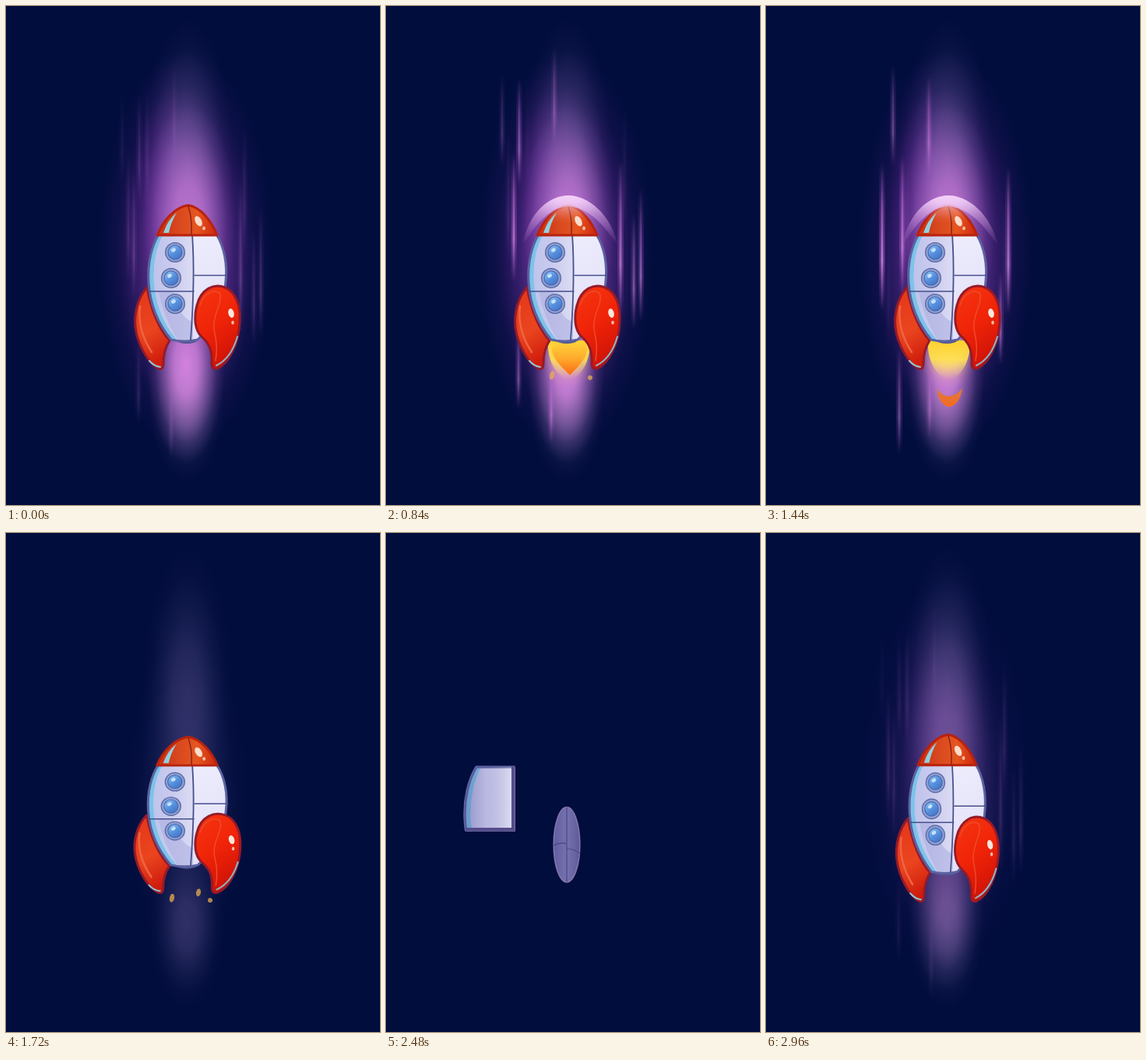
An HTML page with a canvas for the animation above (3000 ms loop, 480 by 640 pixels).

```html
<!DOCTYPE html>
<html lang="en">
<head>
<meta charset="utf-8">
<title>Rocket</title>
<style>
html, body { margin: 0; width: 100%; height: 100%; overflow: hidden; background: #010d3d; }
canvas { display: block; width: 100vw; height: 100vh; }
</style>
</head>
<body>
<canvas id="stage" width="480" height="640"></canvas>
<script>
const ctx = document.getElementById('stage').getContext('2d');
const LOOP = 3000;

const ramp = (t, a, b) => Math.min(1, Math.max(0, (t - a) / (b - a)));
const smooth = x => x * x * (3 - 2 * x);
const easeOut = x => 1 - (1 - x) ** 3;

function scoped(draw, alpha = 1) {
  ctx.save();
  ctx.globalAlpha *= alpha;
  draw();
  ctx.restore();
}

function shape(d, fill, stroke, width = 1) {
  const path = new Path2D(d);
  if (fill) { ctx.fillStyle = fill; ctx.fill(path); }
  if (stroke) { ctx.strokeStyle = stroke; ctx.lineWidth = width; ctx.stroke(path); }
}

function oval(x, y, rx, ry, fill, turn = 0) {
  ctx.beginPath();
  ctx.ellipse(x, y, rx, ry, turn, 0, Math.PI * 2);
  ctx.fillStyle = fill;
  ctx.fill();
}

function linear(x0, y0, x1, y1, ...colors) {
  const g = ctx.createLinearGradient(x0, y0, x1, y1);
  colors.forEach((c, i) => g.addColorStop(i / (colors.length - 1), c));
  return g;
}

// Soft elliptical light
function glow(x, y, rx, ry, rgb, alpha) {
  if (alpha <= 0) return;
  scoped(() => {
    ctx.translate(x, y);
    ctx.scale(rx, ry);
    const g = ctx.createRadialGradient(0, 0, 0, 0, 0, 1);
    [[0, 1], [0.3, 0.82], [0.55, 0.42], [0.8, 0.11], [1, 0]]
      .forEach(([p, a]) => g.addColorStop(p, `rgba(${rgb},${a})`));
    ctx.fillStyle = g;
    ctx.fillRect(-1, -1, 2, 2);
  }, alpha);
}

/* ---------- light behind the rocket ---------- */

function drawBeam(t) {
  const out = t > 2400;
  const pale = out ? 0.85 * ramp(t, 2640, 2960) : 1 - ramp(t, 1690, 1765);
  const violet = out ? 0.3 * ramp(t, 2720, 2960) : 1 - ramp(t, 1560, 1720);
  glow(231, 315, 112, 260, '132,46,172', 0.9 * violet);
  glow(208, 235, 48, 165, '132,52,172', 0.4 * violet);
  glow(233, 205, 58, 190, '135,115,180', 0.5 * pale);
  glow(233, 340, 80, 210, '110,95,165', 0.45 * pale);
  glow(235, 275, 60, 150, '212,128,222', 0.72 * violet);
  glow(232, 505, 48, 105, '150,125,190', 0.5 * pale);
  glow(231, 460, 50, 125, '232,142,236', 0.85 * violet);
}

// x, middle y and length at full brightness, time of that within the cycle, strength
const STREAKS = [
  [149, 295, 190, 480, 1], [175, 280, 180, 480, 0.9], [311, 300, 190, 480, 0.9],
  [163, 140, 130, 480, 0.45], [209, 155, 130, 480, 0.6], [171, 505, 140, 480, 0.5],
  [301, 400, 120, 480, 0.6], [210, 500, 110, 480, 0.5],
  [171, 165, 140, 860, 0.6], [149, 150, 120, 860, 0.25], [164, 275, 165, 860, 0.85],
  [216, 120, 130, 860, 0.4], [301, 305, 200, 880, 0.85], [327, 330, 170, 900, 0.7],
  [318, 350, 150, 900, 0.6], [170, 465, 110, 860, 0.5], [212, 510, 110, 860, 0.6],
  [157, 300, 170, 170, 0.7], [181, 220, 150, 200, 0.6], [306, 270, 170, 180, 0.6]
];

function drawStreaks(t) {
  const power = t > 2400 ? 0.25 * ramp(t, 2760, 2960)
    : (0.35 + 0.65 * ramp(t, 0, 200)) * (1 - ramp(t, 1580, 1700));
  if (!power) return;
  for (const [x, mid, len, peak, strength] of STREAKS) {
    const age = ((t - peak + 1440) % 960) - 480;
    if (Math.abs(age) > 330) continue;
    const alpha = Math.cos(age / 330 * Math.PI / 2);
    const top = mid - len / 2 + age * 0.18;
    scoped(() => {
      ctx.fillStyle = linear(0, top, 0, top + len,
        'rgba(185,95,205,0)', 'rgba(190,105,212,.6)', 'rgba(205,125,222,.85)', 'rgba(185,95,205,0)');
      ctx.fillRect(x - 1.5, top, 3, len);
      ctx.globalAlpha *= 0.35;
      ctx.fillRect(x - 4, top, 8, len);
    }, power * alpha * strength);
  }
}

// Air pressed against the nose: a dome brightest along its top
function drawShock(t) {
  const alpha = ramp(t, 80, 280) * (1 - ramp(t, 1600, 1700));
  if (!alpha || t > 1800) return;
  scoped(() => {
    shape('M175 308 C183 262 212 243 234 243 C258 243 289 266 298 308 C276 275 258 259 234 257 C210 259 194 277 175 308Z',
      linear(0, 243, 0, 308, 'rgba(250,225,255,.75)', 'rgba(215,160,228,.45)', 'rgba(190,120,210,0)'));
    scoped(() => {
      ctx.clip(new Path2D('M175 308 C183 262 212 243 234 243 C258 243 289 266 298 308Z'));
      glow(234, 243, 66, 36, '250,215,252', 0.7);
    });
    ctx.globalAlpha *= Math.max(0, -Math.sin((t - 480) / 960 * Math.PI * 2));
    shape('M167 322 Q170 306 178 290', null, 'rgba(215,195,235,.7)', 2.5);
  }, alpha);
}

/* ---------- flame ---------- */

function drawFlame(t) {
  if (t > 1780) return;
  const u = (t % 480) / 480;
  const power = ramp(t, 60, 160) * (1 - ramp(t, 1600, 1690));
  const dome = 0.55 + 0.45 * Math.abs(2 * u - 1);

  scoped(() => {
    glow(234, 448, 38, 42, '255,215,110', 0.8 * dome);
    shape('M208 429 H262 C263 452 252 477 235 478 C218 477 206 452 208 429Z',
      linear(0, 429, 0, 478, '#ffd22c', 'rgba(255,226,80,.9)', 'rgba(255,222,150,0)'));
    const grow = ramp(u, 0.3, 0.75);
    const fade = 1 - ramp(u, 0.8, 0.92);
    if (grow && fade) {
      scoped(() => {
        ctx.translate(236, 430);
        ctx.scale(0.6 + 0.4 * grow, grow + ramp(u, 0.75, 1) * 1.2);
        shape('M0 43 C-8 35 -22 24 -23 11 C-23 0 -9 -2 0 5 C9 -2 22 0 22 11 C21 24 8 35 0 43Z',
          linear(0, 0, 0, 43, '#ffd43c', '#ffab2c', '#f96a17'));
      }, fade);
    }
  }, power);

  const v = u < 0.5 ? u + 1 : u;
  const drop = ramp(v, 0.83, 0.92) * (1 - ramp(v, 1.03, 1.16));
  if (drop && t > 240) {
    scoped(() => {
      ctx.translate(0, (v - 1) * 170);
      shape('M219 491 Q235 510 252 490 Q249 511 235 514 Q222 511 219 491Z',
        linear(0, 490, 0, 514, '#d97a45', '#f86a1c'));
    }, drop * power);
  }

  const spark = ramp(u, 0.45, 0.58) * (1 - ramp(u, 0.75, 0.95));
  const drift = (u - 0.583) * 34;
  const loose = 1 - ramp(t, 1720, 1790);
  [[213, 468, 3, 5.5], [247, 461, 3, 5], [262, 471, 3, 3]].forEach(([x, y, rx, ry], i) => {
    const late = i === 1 ? ramp(t, 1600, 1680) : 1;
    scoped(() => oval(x, y + drift, rx, ry, '#e8b04e', 0.2), 0.75 * spark * loose * late);
  });
}

/* ---------- rocket parts ---------- */

const HULL = 'M196 293 C178 322 174 382 212 428 Q229 432 246 428 C289 386 290 324 270 293Z';
const EDGE = '#5c62a0';

function hullFill() {
  scoped(() => {
    ctx.clip(new Path2D(HULL));
    ctx.fillStyle = linear(182, 0, 241, 0, '#bcc2ea', '#c9caee', '#dcdcf4');
    ctx.fillRect(175, 285, 66, 150);
    ctx.fillStyle = linear(241, 290, 284, 380, '#eeedfd', '#e3e2f8');
    ctx.fillRect(240, 285, 50, 150);
    shape('M196 366 Q202 400 222 432 H240 V405 Q222 400 215 366Z', 'rgba(172,174,224,.55)');
    shape('M198 291 C181 322 177 382 214 428', null, '#7cc3ea', 8);
  });
  shape(HULL, null, EDGE, 3);
}

function hullSeams() {
  shape('M239 293 Q243 348 237 428', null, '#46508c', 1.8);
  shape('M184 366 H241 M242 345.5 H284', null, '#46508c', 1.5);
}

function hullWhole() {
  oval(232, 429, 13, 4, '#4c5592');
  hullFill();
  hullSeams();
}

const panel = (x, y, w, h) => () => {
  ctx.beginPath();
  ctx.rect(x, y, w, h);
  ctx.clip();
  hullFill();
  ctx.clip(new Path2D(HULL));
  shape(`M${x} ${y}h${w}v${h}h${-w}z`,
    linear(x, 0, x + w, 0, 'rgba(70,60,130,.4)', 'rgba(70,60,130,.1)', 'rgba(255,255,255,.3)'));
  ctx.strokeStyle = '#564c8c';
  ctx.lineWidth = 8;
  ctx.strokeRect(x, y, w, h);
};

function nose() {
  shape('M194 294 C201 276 216 258 234 255.5 C250 258 264 276 271 294Z',
    linear(196, 0, 270, 0, '#c92e10', '#d8481f', '#e5561f', '#cd270d'), '#b8220f', 3);
  shape('M234 257 Q239 272 238 293', null, '#8c2418', 1.5);
  shape('M202 291 Q207 275 219 265 Q211 279 209 291Z', '#94cfe0');
  oval(247, 276, 4, 7, '#fbdccc', -0.5);
  oval(254, 285, 2, 2.5, '#f5b89c');
}

function leftFin() {
  shape('M181 361 C169 374 164 395 166 412 C169 435 183 459 196 465 Q202 467 202 459 C202 447 204 438 210 429 C194 412 186 388 181 361Z',
    linear(166, 380, 208, 450, '#e63a1a', '#ea451f', '#cf1c0c'), '#961a2a', 3);
  shape('M172 385 Q168 415 187 444', null, '#ee6542', 2.5);
  shape('M184 455 Q190 462 198 463', null, '#8cc8d8', 2);
}

function rightFin() {
  shape('M245 384 C250 363 267 355 281 361 C296 367 301 386 300 405 C299 432 286 459 271 465 Q264 467 264 458 C265 441 260 432 251 424 C242 416 241 399 245 384Z',
    linear(245, 370, 298, 440, '#f4330f', '#f02408', '#d21407'), '#961a2a', 3);
  shape('M249 384 C254 368 266 363 274 368 C280 380 262 398 268 420 Q272 438 269 455', null, '#f04a28', 1.5);
  oval(289, 394, 3.6, 6, '#fbe6dc', -0.25);
  oval(291, 406, 1.8, 2.5, '#fbb8a4');
  shape('M297 424 Q289 452 270 461', null, '#8cb8c8', 2);
}

const porthole = (x, y) => () => {
  oval(x, y, 13, 13, '#56659f');
  oval(x, y, 11.8, 11.8, '#8c9dd2');
  oval(x, y, 9.4, 9.4, '#4262aa');
  oval(x, y, 8.4, 8.4, linear(x - 6, y - 7, x + 5, y + 8, '#82b8ee', '#5590de', '#4676c6'));
  oval(x - 2, y - 3, 3, 2.3, '#c4e2fa', -0.6);
};

const LEFT_FIN = { draw: leftFin, c: [188, 412], burst: [-105, 82, -0.5], from: [-70, 70], start: 2600 };
const PANELS = [
  { draw: panel(176, 285, 64, 81), c: [211, 330], burst: [-130, -40, -0.3], from: [-86, 13], start: 2440 },
  { draw: panel(240, 285, 50, 60.5), c: [262, 318], burst: [165, -60, 0.4], from: [100, -25], start: 2500 },
  { draw: panel(176, 366, 64, 68), c: [214, 398], burst: [-80, 75, 0.3], from: [-65, 55], start: 2540 },
  { draw: panel(240, 345.5, 50, 90), c: [262, 385], burst: [150, 45, -0.3], from: [90, 45], start: 2560 }
];
const DETAILS = [
  { draw: nose, c: [234, 278], burst: [5, -88, 0.25], from: [0, -95], start: 2580 },
  { draw: porthole(217, 316), c: [217, 316], burst: [-60, -95, 0], from: [-35, -25], start: 2640 },
  { draw: porthole(212, 349), c: [212, 349], burst: [-150, 10, 0], from: [-45, 0], start: 2670 },
  { draw: porthole(217, 382), c: [217, 382], burst: [-40, 110, 0], from: [-35, 25], start: 2700 },
  { draw: rightFin, c: [272, 412], burst: [140, 80, 0.5], from: [95, 60], start: 2620 }
];
const PARTS = [LEFT_FIN, ...PANELS, ...DETAILS];

function drawWhole() {
  leftFin();
  hullWhole();
  DETAILS.forEach(p => scoped(p.draw));
}

function placed(part, dx, dy, turn, size, alpha) {
  if (alpha <= 0) return;
  const [x, y] = part.c;
  scoped(() => {
    ctx.translate(x + dx, y + dy);
    ctx.rotate(turn);
    ctx.scale(size, size);
    ctx.translate(-x, -y);
    part.draw();
  }, alpha);
}

function drawCore(g, alpha) {
  const rx = 50 * g, ry = 36 + 36 * g, y = 419 - 57 * g;
  scoped(() => {
    oval(232, y, rx, ry, linear(232 - rx, 0, 232 + rx, 0, '#6f69ad', '#8580bf', '#6c65a6'));
    ctx.strokeStyle = '#8d7fb5';
    ctx.lineWidth = 1.5;
    ctx.stroke();
    shape(`M232 ${y - ry} V${y + ry} M${232 - rx} ${y + 1} Q${232 - rx / 2} ${y - 4} 232 ${y - 1}` +
      ` M232 ${y + 5} Q${232 + rx / 2} ${y + 5} ${232 + rx} ${y + 11}`, null, '#46417f', 1.2);
  }, alpha);
}

function drawBurst(t) {
  const k = easeOut(ramp(t, 1790, 2030));
  const alpha = 1 - ramp(t, 1890, 2035);
  drawCore(1 - k, alpha * (1 - k));
  for (const p of PARTS) {
    const [dx, dy, turn] = p.burst;
    placed(p, dx * k, dy * k, turn * k, 1 + 0.1 * k, alpha);
  }
}

function drawAssembly(t) {
  const g = ramp(t, 2400, 2640);
  if (g && t >= 2440) drawCore(g, Math.min(0.9, g * 2.6));
  for (const p of PARTS) {
    const k = 1 - smooth(ramp(t, p.start, p.start + 220));
    placed(p, p.from[0] * k, p.from[1] * k, 0, 1 + 0.14 * k, ramp(t, p.start, p.start + 40));
  }
}

function drawRocket(t) {
  if (t >= 2040 && t < 2440) return;
  scoped(() => {
    if (t > 2400) {
      const pull = ramp(t, 2720, 2940);
      ctx.translate(233, -2.1 * pull);
      ctx.scale(1 - 0.025 * pull, 1 + 0.02 * pull);
      ctx.translate(-233, 0);
    } else {
      const press = smooth(ramp(t, 1640, 1720)) * (1 - ramp(t, 1790, 1860));
      ctx.translate(233, 383);
      ctx.scale(1 + 0.01 * press, 1 - 0.047 * press);
      ctx.translate(-233, -383);
    }
    if (t < 1790) drawWhole();
    else if (t < 2040) drawBurst(t);
    else if (t < 2920) drawAssembly(t);
    else drawWhole();
  });
}

function frame(now) {
  const t = now % LOOP;
  ctx.fillStyle = '#010d3d';
  ctx.fillRect(0, 0, 480, 640);
  drawBeam(t);
  drawStreaks(t);
  drawFlame(t);
  drawRocket(t);
  drawShock(t);
}

ctx.lineCap = 'round';
ctx.lineJoin = 'round';
const begin = performance.now();
(function tick() {
  frame(performance.now() - begin);
  requestAnimationFrame(tick);
})();
</script>
</body>
</html>
```
